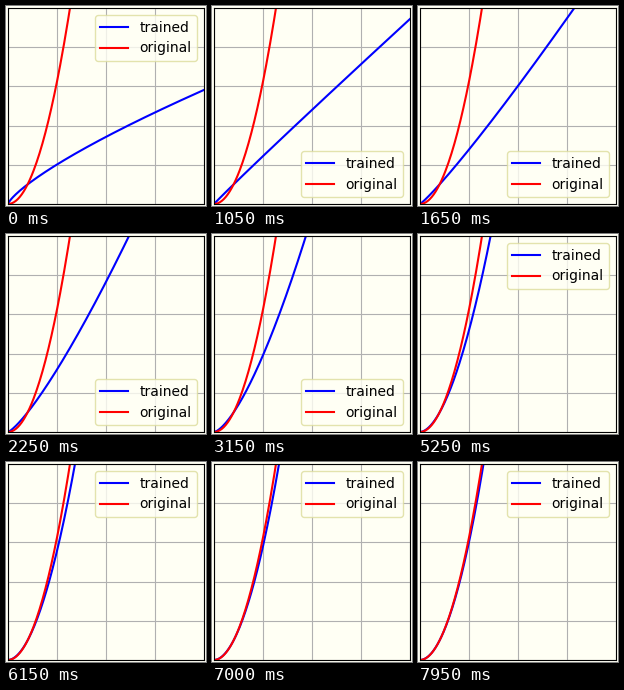
Animation of 200 by 200 pixels, one loop 8 s. Source, as a matplotlib script:

```python
import numpy as np
import matplotlib.pyplot as plt
from matplotlib.animation import FuncAnimation

FRAMES, STEP = 160, 50
BACK = "#fffff4"

# Learned exponent over time (seconds), closing in on 2
TIMES = np.array([0, 1.05, 2.25, 3.15, 4.35, 6.15, 7.95])
POWERS = np.array([0.765, 0.975, 1.265, 1.490, 1.691, 1.8735, 1.959])
SLOPES = np.gradient(POWERS, TIMES)


def exponent(t):
    """Smooth cubic Hermite curve through the learning checkpoints."""
    k = min(np.searchsorted(TIMES, t, side="right") - 1, len(TIMES) - 2)
    h = TIMES[k + 1] - TIMES[k]
    s = (t - TIMES[k]) / h
    ease = s * s * (3 - 2 * s)
    return (POWERS[k] * (1 - ease) + POWERS[k + 1] * ease
            + h * s * (1 - s) * (SLOPES[k] * (1 - s) - SLOPES[k + 1] * s))


fig = plt.figure(figsize=(2, 2), dpi=100, facecolor=BACK)
ax = fig.add_axes([0.01, 0.01, 0.98, 0.98], facecolor=BACK)
ax.set(xlim=(0, 10), ylim=(0, 10),
       xticks=np.arange(0, 10.1, 2.5), yticks=np.arange(0, 10.1, 2))
ax.tick_params(length=0, labelbottom=False, labelleft=False)
ax.grid(True)

x = np.linspace(0, 10, 200)
trained, = ax.plot(x, x ** exponent(0), color="blue", label="trained")
ax.plot(x, x ** 2, color="red", label="original")
# The legend moves to whichever corner the curves leave free
ax.legend(loc="best", fontsize=10, facecolor=BACK, edgecolor="#dcdc9c")


def update(i):
    trained.set_ydata(x ** exponent(i * STEP / 1000))
    return trained,


anim = FuncAnimation(fig, update, frames=FRAMES, interval=STEP,
                     repeat=True, repeat_delay=0, blit=False)
plt.show()
```
